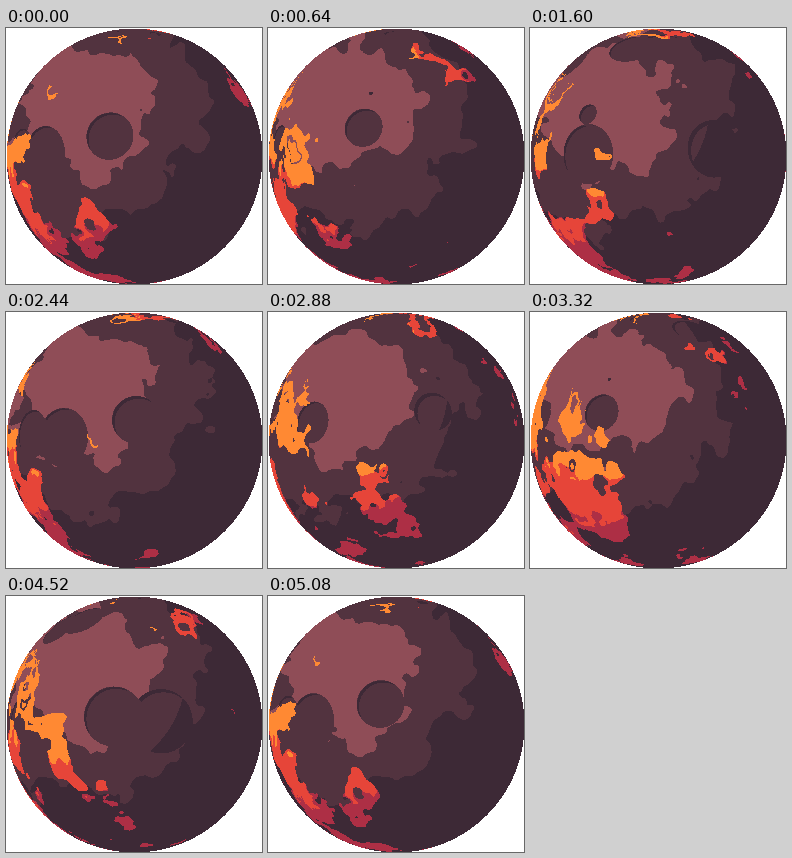
An HTML page with a canvas for the animation above (5120 ms loop, 256 by 256 pixels).

```html
<!DOCTYPE html>
<html lang="en">
<head>
<meta charset="utf-8">
<title>Lava planet</title>
<style>
  html, body { margin: 0; width: 100%; height: 100%; overflow: hidden; background: #fff; }
  canvas { display: block; width: 100%; height: 100%; image-rendering: pixelated; }
</style>
</head>
<body>
<canvas id="planet" width="256" height="256"></canvas>
<script>
const N = 256;
const STEP = 40;          // ms per pose
const POSES = 128;        // poses per loop
const SEED = 9.56;
const LIGHT = 0.3;        // light position on both axes

// turn: cells scrolled per loop
const LAND = { size: 10, turn: 20, octaves: 3, near: 0.4 + 2 / N, far: 0.6 + 2 / N, tile: randomTile(10, 10) };
const LAVA = { size: 10, turn: 20, octaves: 4, near: 0.019, far: 0.036, cutoff: 0.579, tile: randomTile(20, 10) };
const CRATER = { size: 3.5, turn: 8, border: 0.4, tile: randomTile(4, 4) };

// Little-endian ABGR from #rrggbb
const rgb = hex => {
  const v = parseInt(hex.slice(1), 16);
  return (0xff000000 | (v & 255) << 16 | v & 0xff00 | v >> 16) >>> 0;
};
const ROCK = ['#8f4d57', '#52333f', '#3d2936'].map(rgb);
const FIRE = ['#ff8933', '#e64539', '#ad2f45'].map(rgb);

// Random lattice values that repeat every w by h cells
function randomTile(w, h) {
  const values = new Float64Array(w * h);
  for (let y = 0; y < h; y++) {
    for (let x = 0; x < w; x++) {
      const v = Math.sin(x * 12.9898 + y * 78.233) * 15.5453 * SEED;
      values[y * w + x] = v - Math.floor(v);
    }
  }
  return { w, h, values };
}

function noise(x, y, { w, h, values }) {
  const ix = Math.floor(x), iy = Math.floor(y);
  const fx = x - ix, fy = y - iy;
  const x0 = ix % w, x1 = (ix + 1) % w;
  const r0 = iy % h * w, r1 = (iy + 1) % h * w;
  const u = fx * fx * (3 - 2 * fx), v = fy * fy * (3 - 2 * fy);
  const top = values[r0 + x0] * (1 - u) + values[r0 + x1] * u;
  const low = values[r1 + x0] * (1 - u) + values[r1 + x1] * u;
  return top + (low - top) * v;
}

function fbm(x, y, layer) {
  let sum = 0, amp = 0.5;
  for (let i = 0; i < layer.octaves; i++) {
    sum += noise(x, y, layer.tile) * amp;
    x *= 2;
    y *= 2;
    amp *= 0.5;
  }
  return sum;
}

// One disc per cell, 0 inside and 1 outside
function disc(x, y) {
  const { w, h, values } = CRATER.tile;
  const row = Math.floor(y);
  x += row * 0.31;
  const col = Math.floor(x);
  const k = values[row % h * w + col % w];
  const m = Math.hypot(x - col - 0.25 - k * 0.5, y - row - 0.25 - k * 0.5);
  const r = k * 0.25;
  const t = Math.min(1, Math.max(0, (m - 0.9 * r) / (0.1 * r)));
  return t * t * (3 - 2 * t);
}

function crater(x, y, shift) {
  x *= CRATER.size;
  y *= CRATER.size;
  return 1 - disc(x + 11 + shift, y + 11) * disc(x + 12 + shift, y + 12);
}

// Fixed facts of each pixel: flat place (u, v) and place on the globe (x, y)
const cells = [];
for (let py = 0; py < N; py++) {
  for (let px = 0; px < N; px++) {
    const u = px / N, v = py / N;
    if (Math.hypot(u - 0.5, v - 0.5) > 0.49999) continue;
    const cx = u * 2 - 1, cy = v * 2 - 1;
    const k = 0.5 / (Math.sqrt(Math.max(0, 1 - cx * cx - cy * cy)) + 1);
    cells.push({
      at: py * N + px, u, v,
      x: cx * k + 0.5,
      y: cy * k + 0.5,
      light: Math.hypot(u - LIGHT, v - LIGHT),
      warp: fbm(u, v, LAND)
    });
  }
}

const shade = (d, layer, colors) => colors[d > layer.far ? 2 : d > layer.near ? 1 : 0];

// The ground shading scrolls flat; craters and lava follow the globe
function landColor(c, shift) {
  const n = fbm(c.u * LAND.size + c.warp + shift, c.v * LAND.size + c.warp, LAND);
  return shade(c.light + n * 0.3, LAND, ROCK);
}

function craterColor(c, shift) {
  const inside = crater(c.x, c.y, shift);
  if (inside < 0.5) return 0;
  const o = (LIGHT - 0.5) * 0.03;
  const rim = crater(c.x + o, c.y + o, shift) < inside - (0.5 - c.light) * 2;
  return rim || c.light > CRATER.border ? ROCK[2] : ROCK[1];
}

function lavaColor(c, shift) {
  const bend = 2.5 * fbm(c.x * LAVA.size + shift, c.y * LAVA.size, LAVA);
  const flow = fbm(c.x + bend, c.y + bend, LAVA);
  if (flow < LAVA.cutoff) return 0;
  return shade(c.light * c.light * 0.4 * (1 - flow), LAVA, FIRE);
}

const ctx = document.getElementById('planet').getContext('2d');
const poses = [];

function render(pose) {
  const image = ctx.createImageData(N, N);
  const pixels = new Uint32Array(image.data.buffer);
  const turn = pose / POSES;
  const land = turn * LAND.turn, pit = turn * CRATER.turn, lava = turn * LAVA.turn;
  for (const c of cells)
    pixels[c.at] = lavaColor(c, lava) || craterColor(c, pit) || landColor(c, land);
  return image;
}

const start = performance.now();
let shown = -1;

function draw() {
  const t = performance.now() - start;
  const pose = Math.floor((t + 0.01) / STEP) % POSES;
  if (pose !== shown) {
    poses[pose] = poses[pose] || render(pose);
    ctx.putImageData(poses[pose], 0, 0);
    shown = pose;
  }
  requestAnimationFrame(draw);
}
draw();
</script>
</body>
</html>
```
